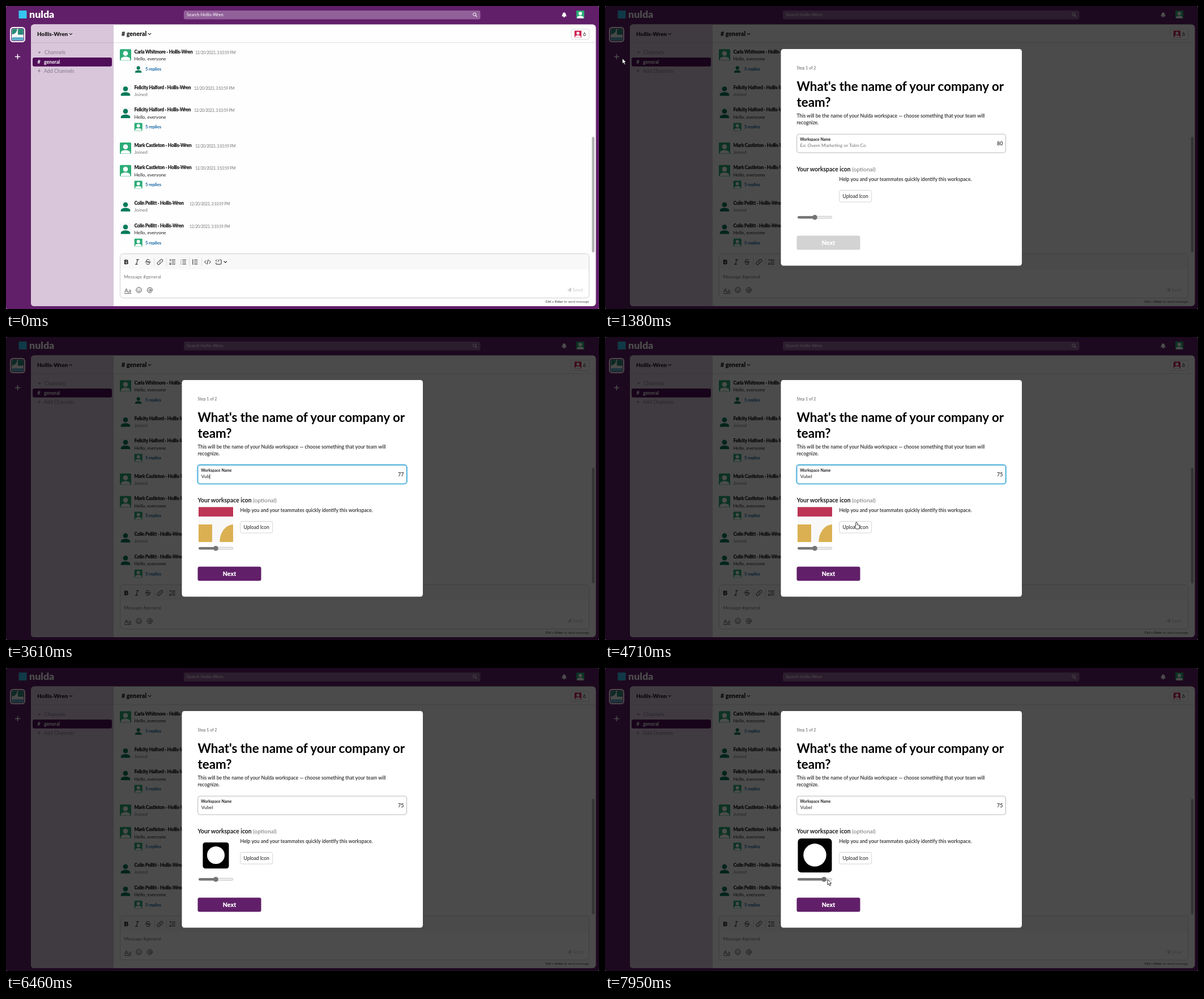
Recreate the animation shown at these times as an HTML page. Size 1047 px wide and 535 px high, loop 8 s.

```html
<!DOCTYPE html>
<html lang="en">
<head>
<meta charset="utf-8">
<title>Create a workspace</title>
<style>
html, body { margin: 0; width: 100%; height: 100%; overflow: hidden; background: #fff; }
svg { display: block; width: 100%; height: 100%; }
text { font-family: Lato, "Open Sans", sans-serif; white-space: pre; }
.line { fill: none; stroke-linecap: round; stroke-linejoin: round; }
</style>
</head>
<body>
<svg id="stage" viewBox="0 0 1047 535" preserveAspectRatio="none"></svg>
<script>
const LOOP = 8000, INK = '#1d1c1d', PLUM = '#611f69';
const TEAM = 'Hollis-Wren', APP = 'nulda', TYPED = 'Vubel';
const KEYS = [3100, 3420, 3610, 3810, 3910];

// ---- drawing helpers ----
const attrs = o => Object.entries(o).map(([k, v]) => ` ${k}="${v}"`).join('');
const rect = (x, y, w, h, fill, r = 0, more = {}) =>
  `<rect${attrs({ x, y, width: w, height: h, rx: r, fill, ...more })}/>`;
const disc = (cx, cy, r, fill, more = {}) => `<circle${attrs({ cx, cy, r, fill, ...more })}/>`;
const line = (d, stroke = INK, w = 1) =>
  `<path class="line"${attrs({ d, stroke, 'stroke-width': w })}/>`;
const shape = (d, fill) => `<path${attrs({ d, fill })}/>`;
const text = (x, y, s, size, fill = INK, weight = 400, more = {}) =>
  `<text${attrs({ x, y, 'font-size': size, fill, 'font-weight': weight, ...more })}>${s}</text>`;
const group = (id, body) => `<g id="${id}">${body}</g>`;
const tight = n => ({ 'letter-spacing': -n });
const plus = (x, y, r, color, w) => line(`M${x - r} ${y}h${2 * r}M${x} ${y - r}v${2 * r}`, color, w);
const chevron = (x, y) => line(`M${x - 2.3} ${y - 1.2}l2.3 2.3 2.3-2.3`, INK, 1.1);

function avatar(x, y, size, back, front) {
  return `<g transform="translate(${x} ${y}) scale(${size / 20})">` +
    rect(0, 0, 20, 20, back, 1.5) + disc(10, 7.4, 4.3, front) +
    shape('M1.8 19.5V18C1.8 14.8 5.5 13.3 10 13.3S18.2 14.8 18.2 18V19.5Z', front) + '</g>';
}
const bright = (x, y, s) => avatar(x, y, s, '#2bac76', '#fff');
const dark = (x, y, s) => avatar(x, y, s, '#f8f8f8', '#007a5a');

// ---- page parts ----
function topBar() {
  return rect(0, 0, 1047, 535, PLUM, 2) +
    rect(22.5, 8, 14, 14, '#36c5f0') +
    text(41, 20.7, APP, 17.8, '#fff', 900) +
    rect(314, 8, 523.5, 15.5, '#93619a', 3) +
    text(319, 18.3, 'Search ' + TEAM, 7.7, '#fff') +
    disc(827.3, 14.7, 2.6, 'none', { stroke: '#fff' }) + line('M829.3 16.8l2 2', '#fff', 1.1) +
    shape('M981 18.2Q982.6 16.8 982.6 14Q982.8 11.6 985.5 11.2Q988.2 11.6 988.4 14Q988.4 16.8 990 18.2Z', '#fff') +
    disc(985.5, 19, 1.3, '#fff') + bright(1007, 8, 14);
}

function rail() {
  return rect(8, 38, 25, 25, PLUM, 4.5, { stroke: '#fff', 'stroke-width': 2 }) +
    rect(10, 40, 21, 21, '#f5f7f6', 2.5) +
    shape('M10.5 50.5V43Q10.5 40.3 13 40.3H19.8Q19.4 49 10.5 50.5Z', '#2a8a78') +
    rect(21, 40.3, 9.7, 10.5, '#2a8a78', 1.5) + rect(10.4, 55.2, 20.2, 5.6, '#5aa9c9', 1.5) +
    group('plusHover', rect(10.5, 80, 20.5, 20, '#8b5e92', 4)) +
    plus(20.5, 89.5, 4, '#fff', 1.5);
}

function sidebar() {
  const gray = '#85788a';
  return rect(44, 32.5, 997.5, 497.5, '#fefefe', 6) +
    shape('M190 32.5H50Q44 32.5 44 38.5V524Q44 530 50 530H190Z', '#d9c6db') +
    rect(44, 64.2, 146, 1, '#c4b0c6') + rect(190, 64.2, 851.5, 1, '#dcdcdc') +
    text(55, 53, TEAM, 10, INK, 900) + chevron(114.3, 49.6) +
    shape('M56.3 80.7h5.2l-2.6 3.2Z', gray) + text(68, 84.7, 'Channels', 9.2, gray) +
    rect(47, 91, 140, 15.8, '#500d58', 3) +
    text(55.5, 102, '#', 9, '#fff', 700) + text(67, 101.8, 'general', 8.6, '#fff', 700) +
    plus(58.5, 114.5, 2.5, gray, 1) + text(67, 118, 'Add Channels', 8.8, gray);
}

function message(y, name, face, timeX, body, replyFace) {
  return face(201, y - 4.7, 20) +
    text(226.5, y + 3, `${name} - ${TEAM}`, 8.4, INK, 900, tight(0.35)) +
    text(timeX, y + 4, '12/20/2023, 3:10:59 PM', 6.8, '#757575', 400, tight(0.22)) +
    text(226.5, y + 15.3, body, 8.2, body === 'Joined' ? '#757575' : INK) +
    (replyFace ? replyFace(226.7, y + 23.2, 14) +
      text(246, y + 33, '5 replies', 7.8, '#1264a3', 700, tight(0.15)) : '');
}

function feed() {
  const people = [['Carla Whitmore', bright, 334], ['Felicity Halford', dark, 332],
    ['Mark Castleton', bright, 334], ['Colin Pellitt', dark, 324]];
  return text(204, 53.4, '# general', 10.7, INK, 900) + chevron(253.6, 49.6) +
    rect(998, 41, 31.5, 18, '#fff', 3, { stroke: '#d8d8d8' }) +
    avatar(1003.7, 43.5, 12.3, '#cd2553', '#fff') + text(1018.7, 53, '6', 9) +
    people.map(([name, face, x], i) => {
      const y = 81 + i * 102.2;
      return (i ? message(y - 39.6, name, face, x, 'Joined') : '') +
        message(y, name, face, x, 'Hello, everyone', i ? bright : dark);
    }).join('') +
    rect(1034.5, 231, 4.6, 204, '#b3b3b3', 2.3);
}

function composer() {
  const rows = (x, w) => [-3.5, 0, 3.5].map(d => `M${x} ${452 + d}h${w}`).join('');
  const bars = [261.5, 283, 323.5, 345].map(x => rect(x, 444.5, 0.8, 15, '#d5d5d5')).join('');
  return rect(201.5, 437.5, 828, 78, '#fff', 5, { stroke: '#d0d0d0' }) +
    shape('M202 465V442.5Q202 438 206.5 438H1024.5Q1029 438 1029 442.5V465Z', '#f8f8f8') + bars +
    text(208.3, 456.3, 'B', 12, INK, 900) +
    line('M230.3 447.8h4.2M228.3 456h4.2M232.4 447.8l-2 8.2') +
    line('M253.6 449Q252.8 447.6 250.6 447.6Q247.8 447.7 247.8 449.6Q247.8 451 250.6 451.9Q253.6 452.7 253.5 454.3Q253.3 456.2 250.6 456.2Q248 456.1 247.4 454.6M246 451.9h9.4') +
    line('M270.7 453.3a2.4 2.4 0 0 0 3.4 0l2-2a2.4 2.4 0 0 0-3.4-3.4l-1 1M273.1 450.6a2.4 2.4 0 0 0-3.4 0l-2 2a2.4 2.4 0 0 0 3.4 3.4l1-1') +
    line(rows(292.5, 6) + 'M289.3 448l.8-.6v2.6M289 454h1.6l-1.6 2.4h1.7') +
    line(rows(311.8, 5.8) + rows(308.6, 0.3)) +
    line(rows(332.6, 5.4) + 'M329.8 447.6v8.8') +
    line('M353.3 449.3l-2.7 2.7 2.7 2.7M358.7 449.3l2.7 2.7-2.7 2.7M357 448l-2 8') +
    line('M372 448l-1.7 1.7 1.7 1.7M374.4 448l1.7 1.7-1.7 1.7M377.5 448h1.4q1.2 0 1.2 1.2v5.6q0 1.2-1.2 1.2h-7q-1.2 0-1.2-1.2V453.5') +
    chevron(387.3, 452) +
    text(208.3, 481, 'Message #general', 8.3, '#757575') +
    text(209, 505.7, 'Aa', 10.3, '#4a4a4a') + rect(209, 507.2, 12.2, 0.9, '#4a4a4a') +
    disc(234.5, 501.5, 4.7, 'none', { stroke: '#4a4a4a' }) +
    disc(232.8, 500.2, 0.7, '#4a4a4a') + disc(236.2, 500.2, 0.7, '#4a4a4a') +
    line('M232 502.8q2.5 2.5 5 0', '#4a4a4a') +
    disc(254, 501.8, 1.9, 'none', { stroke: '#4a4a4a' }) +
    line('M255.9 500v2.2q.2 1.5 1.5 1.4 1.3-.2 1.2-2a4.6 4.6 0 1 0-2 3.9', '#4a4a4a') +
    shape('M991 501.2l7.5-4.2-1.2 7.6-2.5-1.2-1.3 1.5v-2.4l3.4-3.6-4.2 3.2Z', '#c9c9c9') +
    text(1000.5, 503.6, 'Send', 8.2, '#c9c9c9') +
    text(1029.5, 524, '<tspan font-weight="700">Ctrl + Enter</tspan> to send message', 6.1, '#555', 400, { 'text-anchor': 'end' });
}

function tooltip() {
  return group('tooltip', rect(37, 81, 69, 20, '#000', 4) + text(42.3, 93.4, 'Create workspaces', 7, '#fff'));
}

function iconArt() {
  return group('pattern', rect(340, 300.3, 61, 61.7, '#f8f8f8') +
      rect(340, 300.3, 61, 16.7, '#bd3455') + rect(340, 331, 24, 31, '#dab052') +
      shape('M401 331A24 31 0 0 0 377.3 362H401Z', '#dab052')) +
    group('upload', rect(-23, -23, 46, 46, '#000', 4.5) + disc(0, -0.5, 15.5, '#fff'));
}

function modal() {
  return group('modal', rect(0, 0, 1047, 535, '#000', 2, { opacity: 0.7 }) +
    rect(310.5, 76, 425.5, 382.5, '#fff', 4.5) +
    text(338.5, 112, 'Step 1 of 2', 7.1, '#5f5f60') +
    text(338.5, 150, "What's the name of your company or", 22.4, '#000', 700) +
    text(338.5, 178, 'team?', 22.4, '#000', 700) +
    text(338.5, 197.2, 'This will be the name of your Nulda workspace — choose something that your team will', 8.7, INK, 500) +
    text(338.5, 209.2, 'recognize.', 8.7, INK, 500) +
    rect(338, 225.5, 370, 34, 'none', 5, { id: 'glow', stroke: '#1d9bd1', 'stroke-opacity': 0.3, 'stroke-width': 3 }) +
    rect(338.7, 226.2, 368.8, 32.8, '#fff', 4, { id: 'field' }) +
    text(344.3, 238.3, 'Workspace Name', 6.9, INK, 700) +
    text(344.6, 249.2, 'Ex: Ovem Marketing or Tolm Co', 8.35, '#757575', 400, { id: 'hint' }) +
    text(344.8, 249.2, '', 8.35, INK, 400, { id: 'typed' }) +
    rect(344.3, 242, 0.8, 9, INK, 0, { id: 'caret' }) +
    text(702.5, 246.3, '80', 9, INK, 500, { id: 'count', 'text-anchor': 'end' }) +
    text(338.5, 292, 'Your workspace icon', 10.4, INK, 700) +
    text(436, 292, '(optional)', 10.2, '#757575') + iconArt() +
    text(413.5, 309, 'Help you and your teammates quickly identify this workspace.', 8.63, INK, 500) +
    rect(413.7, 325.5, 57, 20.5, '#fff', 3, { stroke: '#d4d4d4' }) +
    text(419.5, 338.7, 'Upload Icon', 8.65) +
    rect(340.4, 371.2, 60.2, 3.8, '#efefef', 1.9, { stroke: '#b5b5b5', 'stroke-width': 0.8 }) +
    rect(340, 370.9, 30, 4.4, '#757575', 2.2, { id: 'fill' }) +
    disc(370.4, 373.1, 4.4, '#757575', { id: 'thumb' }) +
    rect(338.5, 405.5, 112, 25, '#d3d3d3', 3, { id: 'next' }) +
    text(394.5, 421.6, 'Next', 10.6, '#fff', 900, { 'text-anchor': 'middle' }));
}

function pointer() {
  const body = (id, d) => `<path${attrs({ id, d, fill: '#fff', stroke: '#000', 'stroke-width': 0.8, 'stroke-linejoin': 'round' })}/>`;
  return disc(0, 0, 6, '#d9a91f', { id: 'ring', opacity: 0.8 }) +
    group('pointer', body('arrow', 'M0 0V9.5L2.3 7.4 3.9 11 5.6 10.2 4 6.8H7Z') +
      body('hand', 'M-1.3 1Q-1.3-.3 0-.3T1.3 1V4.2L5 5Q6 5.4 5.8 6.6L5.3 9.5Q4.9 11.8 3 11.8H.8Q-.5 11.8-1.3 10.4L-3.6 7Q-3.4 5.6-1.3 6.8Z') +
      group('beam', line('M-1.5-4.5H1.5M0-4.5V4.5M-1.5 4.5H1.5', '#000', 0.9)));
}

document.getElementById('stage').innerHTML =
  topBar() + rail() + sidebar() + feed() + composer() + tooltip() + modal() + pointer();

const ui = {};
document.querySelectorAll('[id]').forEach(el => ui[el.id] = el);
const set = (el, o) => { for (const k in o) el.setAttribute(k, o[k]); };
const show = (el, on) => el.setAttribute('visibility', on ? 'inherit' : 'hidden');

// ---- pointer path: start time, steps of 100 ms, end point, look on arrival ----
const LEGS = [
  [0, 1, 1010, 410, ''], [390, 1, 1010, 410, 'arrow'], [490, 1, 203, 269, 'arrow'],
  [780, 5, 30.3, 92, 'hand'], [1380, 1, 30.5, 92.5, 'arrow'], [1480, 1, 39, 94, 'arrow'],
  [1600, 4, 463.5, 254.5, 'beam'], [3100, 1, 463.5, 254.5, ''], [4310, 1, 463.5, 254.5, 'beam'],
  [4410, 4, 444, 327.3, 'hand'], [4830, 1, 451.5, 328, 'hand'], [5030, 1, 444, 327.3, 'hand'],
  [5440, 1, 354.5, 318.5, 'arrow'], [5540, 1, 84, 320, ''],
  [6560, 1, 84, 320, 'arrow'], [6660, 3, 608.5, 382.5, 'arrow'], [6960, 4, 399.5, 373.5, 'arrow'],
  [7370, 2, 371, 373.5, 'arrow'], [7570, 5, 392.9, 373.4, 'arrow']
];
// ---- clicks: start, end, centre, radius ----
const CLICKS = [[1280, 1380, 30, 91.5, 6], [1900, 2000, 463.5, 254.5, 6], [4930, 5150, 451.5, 328, 4.8]];
const DRAG = 7570;
const smooth = p => p * p * (3 - 2 * p);

function pointerAt(t) {
  const i = LEGS.findLastIndex(leg => t >= leg[0]);
  const [start, steps, x, y, look] = LEGS[i];
  const [, , px, py] = LEGS[Math.max(0, i - 1)];
  const p = Math.min(1, (Math.round((t - start) / 100 - 0.3) + 1) / steps), e = smooth(p);
  return { x: px + (x - px) * e, y: py + (y - py) * e, look: p < 1 ? 'arrow' : look };
}

function draw(t) {
  const within = (a, b) => t >= a && t < b;
  const at = pointerAt(t);
  set(ui.pointer, { transform: `translate(${at.x} ${at.y})` });
  for (const look of ['arrow', 'hand', 'beam']) show(ui[look], at.look === look);

  const open = t >= 1380, focus = within(1900, 4930), hover = within(1180, 1380);
  show(ui.modal, open);
  show(ui.tooltip, hover);
  show(ui.plusHover, hover);

  const click = CLICKS.find(([a, b]) => within(a, b));
  show(ui.ring, click);
  if (click) set(ui.ring, { cx: click[2], cy: click[3], r: click[4] });

  const typed = KEYS.filter(k => t >= k).length;
  const lastKey = typed ? KEYS[typed - 1] : 2100;
  ui.typed.textContent = TYPED.slice(0, typed);
  ui.count.textContent = 80 - typed;
  show(ui.hint, open && !typed);
  show(ui.glow, open && focus);
  set(ui.field, { stroke: focus ? '#1d9bd1' : '#b8b8b8', 'stroke-width': focus ? 1.2 : 1 });
  show(ui.caret, focus && (t - lastKey) % 1000 < 500);
  set(ui.caret, { x: 344.3 + (typed ? ui.typed.getComputedTextLength() + 0.6 : 0) });
  set(ui.next, { fill: typed ? PLUM : '#d3d3d3' });

  // the knob trails the pointer while dragged
  const knob = t < DRAG ? 370.4 : Math.max(370.4, at.x - 6.2);
  set(ui.thumb, { cx: knob });
  set(ui.fill, { width: knob - 340 });
  show(ui.pattern, within(1480, 6460));
  show(ui.upload, t >= 6460);
  set(ui.upload, { transform: `translate(370.5 331) scale(${1 + (knob - 370.4) * 0.0187})` });
}

function tick() {
  draw(performance.now() % LOOP);
  requestAnimationFrame(tick);
}
tick();
</script>
</body>
</html>
```
